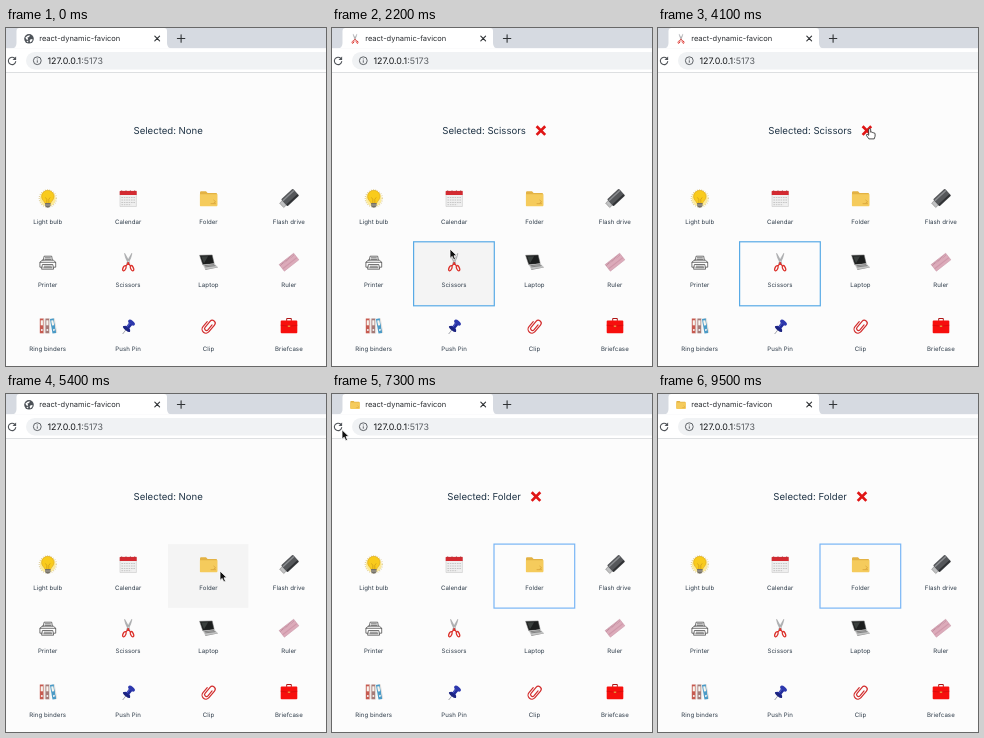
An HTML page that plays this animation: 320x338 px, repeating every 9.8 s.

```html
<!DOCTYPE html>
<html lang="en">
<head>
<meta charset="utf-8">
<title>react-dynamic-favicon</title>
<style>
  html, body { margin: 0; width: 100%; height: 100%; overflow: hidden; background: #fcfcfc; }
  svg { display: block; }
  text { font-family: Inter, "Open Sans", sans-serif; fill: #213547; text-rendering: geometricPrecision; }
  .label { font-size: 6.1px; letter-spacing: .06px; text-anchor: middle; fill: #2c3a48; }
  .title { font-size: 9.6px; text-anchor: middle; }
  .line { fill: none; stroke-linecap: round; stroke-linejoin: round; }
</style>
</head>
<body>
<svg id="stage" width="320" height="338" viewBox="0 0 320 338">
  <defs>
    <g id="bulb">
      <circle r="8" fill="#fdeb9a"/>
      <circle r="8.6" fill="none" stroke="#d9c68a" stroke-width="1.2" stroke-dasharray=".7 1.5"/>
      <path d="M-2.8 5C-3 3-6.2 1.6-6.2-2a6.2 6.2 0 0 1 12.4 0C6.2 1.6 3 3 2.8 5z" fill="#f9cb1c" stroke="#d9a520" stroke-width=".6"/>
      <path class="line" d="M-1 4.4V.8L-2.2-.8M1 4.4V.8L2.2-.8" stroke="#b98518" stroke-width=".5"/>
      <path d="M-2.7 4.6H2.7V7.6L1.2 9H-1.2L-2.7 7.6z" fill="#6b675f"/>
      <path d="M-2.6 5.8H2.6M-2.6 7.2H2.6" stroke="#c4c0b5" stroke-width=".5"/>
    </g>
    <g id="calendar">
      <path d="M-8.2-6.5H8.2V8H-8.2z" fill="#efefef" stroke="#c9c9c9" stroke-width=".6"/>
      <path d="M-8.5-7.6H8.5V-3.5H-8.5z" fill="#d42a31"/>
      <path d="M-6.5-8.3V-6.3M-2.2-8.3V-6.3M2.2-8.3V-6.3M6.5-8.3V-6.3" stroke="#a33a3d" stroke-width=".6"/>
      <path d="M-6.8-1H6.8M-6.8 1.5H6.8M-6.8 4H6.8M-6.8 6.2H3" stroke="#c6c6c6" stroke-dasharray="1.6 .8"/>
    </g>
    <g id="folder">
      <path d="M-8.6-6.1Q-8.6-7.2-7.4-7.2H-2.6L-1-5.6H7.4Q8.5-5.6 8.5-4.4V6.4H-8.6z" fill="#e3b244"/>
      <path d="M-8.7-4.2H8.8V7Q8.8 7.8 8 7.8H-8Q-8.7 7.8-8.7 7z" fill="#f5cb5c"/>
      <path d="M2.4 5.2h4.5M5.2 1.7l1.8 1.6-1.8 1.3" class="line" stroke="#dba63c" stroke-width=".9"/>
    </g>
    <g id="drive" transform="rotate(-43)">
      <rect x="-10" y="-3" width="5" height="6" fill="#c0c1c2" stroke="#777" stroke-width=".5"/>
      <rect x="-6.5" y="-4.7" width="16" height="9.4" rx="1" fill="#55575a"/>
      <path d="M-6-2.6H9" stroke="#8b8d90" stroke-width="1.5"/>
      <path d="M-6 3.4H9" stroke="#303234" stroke-width="1.8"/>
    </g>
    <g id="printer" class="line" stroke="#3a3a3a" stroke-width=".7">
      <path d="M-4.6-1.8L-3.7-6H3.9L4.6-1.8M-2.4-4.4H2.6M-2.8-2.9H3"/>
      <path d="M-5.5-2H5.5L7.9 0V5H5.4M-5.4 5H-7.9V0L-5.5-2M-7.6 .1H7.6" fill="#fff"/>
      <path d="M-5 2.3H5L5.8 7H-5.8zM-3.6 4H3.6M-4 5.5H4" fill="#fff"/>
    </g>
    <g id="scissors">
      <path d="M-3.6-9Q-3.6-5 .8 2.2L1.7 1.4Q-.9-5-3.6-9zM3.6-9Q3.6-5-.8 2.2L-1.7 1.4Q.9-5 3.6-9z" fill="#b3b5b7" stroke="#8d8f91" stroke-width=".4"/>
      <g class="line" stroke="#dc302a" stroke-width="1.3">
        <path d="M.3 .6L-2 3.4M-.3 .6L2 3.4"/>
        <ellipse cx="-3.8" cy="6" rx="1.4" ry="2.8" transform="rotate(24 -3.8 6)"/>
        <ellipse cx="3.8" cy="6" rx="1.4" ry="2.8" transform="rotate(-24 3.8 6)"/>
      </g>
    </g>
    <g id="laptop">
      <path d="M-9-6.9L3.6-7.3 5.6 1.4-5.8 2.6z" fill="#1c1e1e" stroke="#777" stroke-width=".5"/>
      <path d="M-7.4-5.7L-.5-5.9-4.6 1z" fill="#3a3f3d"/>
      <path d="M-5.8 2.6L5.6 1.4 9.2 4.7-3.4 7z" fill="#c3c4c4"/>
      <path d="M-4.2 3.5L5.5 2.4M-3.4 4.7L6.8 3.4" stroke="#666" stroke-width=".7"/>
      <path d="M-3.4 7L9.2 4.7V5.4L-3.4 7.8z" fill="#8a8a8a"/>
    </g>
    <g id="ruler" transform="rotate(-38)">
      <rect x="-9.2" y="-4.2" width="18.4" height="8.4" fill="#dcabba" stroke="#c794a5" stroke-width=".5"/>
      <path d="M-9-3H9" stroke="#b07d8e" stroke-width="1.6" stroke-dasharray=".5 1"/>
      <path d="M-9 1.2H9" stroke="#cf98aa" stroke-width="1.2"/>
    </g>
    <g id="binder">
      <path d="M-2.2-7.4H1.8V7.4H-2.2z"/>
      <path d="M-1.3-5.6H.9V-.6H-1.3z" fill="#f7f5ef"/>
      <path d="M1.6-7.4H2.6V7.4H1.6z" fill="#e4e0dc"/>
      <circle cx="-.2" cy="4" r="1" fill="#f4f4f4"/>
    </g>
    <g id="binders">
      <use href="#binder" x="-5.8" fill="#c65a50"/>
      <use href="#binder" x="-.2" fill="#a57b78"/>
      <use href="#binder" fill="#4a9ac6" transform="translate(5.6 0) rotate(-10)"/>
    </g>
    <g id="pin" transform="translate(0 1) rotate(38)">
      <path d="M0 2V9" stroke="#9597a0" stroke-width=".8"/>
      <path d="M-2-5H2L1.8 .2Q4 1 4.2 2.6H-4.2Q-4 1-1.8 .2z" fill="#222c9c"/>
      <ellipse cy="-5.4" rx="3.9" ry="2.1" fill="#2d38ad"/>
      <ellipse cy="2.7" rx="4.4" ry="1.5" fill="#1c2480"/>
      <path d="M-.9-3.6V.6" stroke="#6f79dc" stroke-width=".7"/>
    </g>
    <path id="clip" class="line" transform="rotate(40)" d="M2-3V3.4A1.9 1.9 0 0 1-1.8 3.4V-4.4A2.9 2.9 0 0 1 4-4.4V4.2A3.9 3.9 0 0 1-3.8 4.2V-2.4" stroke="#d22c2c" stroke-width="1.2"/>
    <g id="briefcase">
      <path d="M-2.3-5.4V-7.4H2.3V-5.4" class="line" stroke="#b01515"/>
      <rect x="-8.3" y="-5.4" width="16.6" height="12.8" rx="1" fill="#f70f0d"/>
      <path d="M-8-.6Q0 1.4 8-.6" class="line" stroke="#c60c0c" stroke-width=".6"/>
      <path d="M-1.2 .3H1.2" stroke="#e8b04a" stroke-width="1.2"/>
    </g>
    <g id="globe">
      <circle r="4.8" fill="#4d5258"/>
      <path d="M-3.7-1Q-1.8-3.8.8-3.5L.2-1.7-1.6-1.2-.8.5-2 1.1zM1.1 3.7L.7 1.5 2 .3 3.8.8Q3.3 2.9 1.1 3.7zM-2.7 2.3L-.6 2-1 3.7z" fill="#fff"/>
    </g>
    <path id="arrow" d="M0 0V9.4L2.2 7.4 3.8 11 5.5 10.2 4 6.8H7z" fill="#111" stroke="#fff" stroke-width=".8" stroke-linejoin="round"/>
    <path id="hand" d="M-1 .8Q-.9-.4 0-.4T1 .8V3.2Q1.9 2.7 2.5 3.5 3.4 3 4 3.9 5.4 3.7 5.4 5.1V7.2L4.5 9.9H-.8L-3.2 6.6Q-3.7 5.4-2.6 5.3L-1 6.3z" fill="#fff" stroke="#222" stroke-width=".8" stroke-linejoin="round"/>
  </defs>

  <rect width="320" height="338" fill="#fcfcfc"/>
  <rect width="320" height="20.5" fill="#d6dae1"/>
  <path d="M5 20.5Q10.5 20.5 10.5 15V3Q10.5 0 13.5 0H158Q161 0 161 3V15Q161 20.5 166.5 20.5z" fill="#fff"/>
  <rect y="20.3" width="320" height="24" fill="#fff"/>
  <path d="M0 44.5H320" stroke="#dddfe1"/>
  <use id="tabIcon"/>
  <text x="33.2" y="13.4" font-size="7.5" style="fill:#2b2e32">react-dynamic-favicon</text>
  <path d="M148.8 8.1l4.8 4.8m0-4.8l-4.8 4.8M171.4 10.5h7.4m-3.7-3.7v7.4" class="line" stroke="#303336" stroke-width="1.1"/>
  <rect x="20" y="24" width="330" height="17.4" rx="8.7" fill="#f0f2f4"/>
  <circle id="glow" cx="6" cy="32.7" r="8" fill="#e6e8eb"/>
  <path d="M8.8 30.4A3.7 3.7 0 1 0 9.7 33.6" class="line" stroke="#505459" stroke-width="1.1"/>
  <path d="M10.1 28.5V32.1H6.5z" fill="#505459"/>
  <circle cx="31.3" cy="32.7" r="3.9" fill="none" stroke="#5f6368"/>
  <path d="M31.3 32.3V34.7M31.3 30.5V31.4" stroke="#5f6368"/>
  <text x="41.4" y="36" font-size="8.9" style="fill:#15171a">127.0.0.1<tspan fill="#5a5e63">:5173</tspan></text>

  <g id="page">
    <text id="title" class="title" y="106.3"></text>
    <path id="cross" d="M-4.3-4.3L4.3 4.3M4.3-4.3L-4.3 4.3" stroke="#e01515" stroke-width="2.7"/>
    <rect id="hover" width="80.4" height="63.7" fill="#f4f4f4"/>
    <rect id="ring" width="80.7" height="64" fill="none" stroke-width="1.2"/>
    <g id="grid"></g>
  </g>
  <use id="cursor"/>
</svg>
<script>
const LOOP = 9800, STEP = 100;
const LEFT = 1.2, TOP = 150.1, CELL_W = 80.4, CELL_H = 63.7;
const items = [
  ['bulb', 'Light bulb'], ['calendar', 'Calendar'], ['folder', 'Folder'], ['drive', 'Flash drive'],
  ['printer', 'Printer'], ['scissors', 'Scissors'], ['laptop', 'Laptop'], ['ruler', 'Ruler'],
  ['binders', 'Ring binders'], ['pin', 'Push Pin'], ['clip', 'Clip'], ['briefcase', 'Briefcase']
];
const FOLDER = 2, SCISSORS = 5;
// time, x, y of the pointer
const path = [
  [900, 186, 66], [1300, 162, 140], [1800, 127, 213], [2200, 118, 221], [2700, 118, 221],
  [3200, 152, 168], [3700, 202, 118], [4100, 211.7, 101], [4600, 211.7, 101], [4800, 216, 112],
  [5100, 218, 153], [5400, 214, 177], [5900, 212, 177], [6200, 170, 138], [6700, 24, 56],
  [7000, 11, 38], [7300, 10, 35.8], [7700, 9, 35], [8700, 9, 35], [9000, 1, 16], [9100, -8, 8]
];
// time, selected item
const picks = [[0, -1], [2000, SCISSORS], [4500, -1], [5900, FOLDER]];
const crossX = { [SCISSORS]: 208.9, [FOLDER]: 204 };
const ringColor = { [SCISSORS]: '#58aae6', [FOLDER]: '#78b5f5' };

const $ = id => document.getElementById(id);
const set = (id, attrs) => {
  for (const key in attrs) $(id).setAttribute(key, attrs[key]);
};
const show = (id, on) => set(id, { visibility: on ? 'visible' : 'hidden' });
const corner = i => ({ x: LEFT + i % 4 * CELL_W, y: TOP + Math.floor(i / 4) * CELL_H });

$('grid').innerHTML = items.map(([icon, name], i) => {
  const { x, y } = corner(i), mid = x + CELL_W / 2;
  return `<use href="#${icon}" x="${mid + 0.4}" y="${y + 20.4}"/>` +
    `<text class="label" x="${mid + 0.3}" y="${y + 45.5}">${name}</text>`;
}).join('');

function pointerAt(t) {
  const n = path.findIndex(p => p[0] > t);
  if (n < 1) return null;
  const [t0, x0, y0] = path[n - 1], [t1, x1, y1] = path[n];
  const k = (t - t0) / (t1 - t0);
  return { x: x0 + (x1 - x0) * k, y: y0 + (y1 - y0) * k };
}

function cellAt(p) {
  if (!p || p.x < LEFT || p.y < TOP) return -1;
  return Math.floor((p.y - TOP) / CELL_H) * 4 + Math.floor((p.x - LEFT) / CELL_W);
}

function draw(t) {
  const pick = picks.filter(p => p[0] <= t).pop()[1];
  const picked = pick >= 0;
  const pointer = pointerAt(t), over = cellAt(pointer);
  const loading = t >= 7500 && t < 7600;

  $('page').style.display = loading ? 'none' : '';
  $('title').textContent = 'Selected: ' + (picked ? items[pick][1] : 'None');
  set('title', { x: picked ? 152.1 : 162.2 });
  show('cross', picked);
  show('ring', picked);
  if (picked) {
    set('cross', { transform: `translate(${crossX[pick]} 102.6)` });
    set('ring', { ...corner(pick), stroke: ringColor[pick] });
  }
  show('hover', over >= 0);
  if (over >= 0) set('hover', corner(over));

  const tab = picked && !loading;
  set('tabIcon', {
    href: '#' + (tab ? items[pick][0] : 'globe'),
    transform: `translate(23 10.8) scale(${tab ? 0.54 : 1})`
  });

  show('glow', t >= 7600 && t < 8800);
  show('cursor', pointer);
  if (pointer) {
    const onCross = picked && Math.hypot(pointer.x - crossX[pick], pointer.y - 102.6) < 7;
    set('cursor', { href: onCross ? '#hand' : '#arrow', x: pointer.x, y: pointer.y });
  }
}

const start = performance.now();
let last = -1;
function tick() {
  const t = Math.floor((performance.now() - start) % LOOP / STEP) * STEP;
  if (t !== last) draw(last = t);
  requestAnimationFrame(tick);
}
tick();
</script>
</body>
</html>
```
